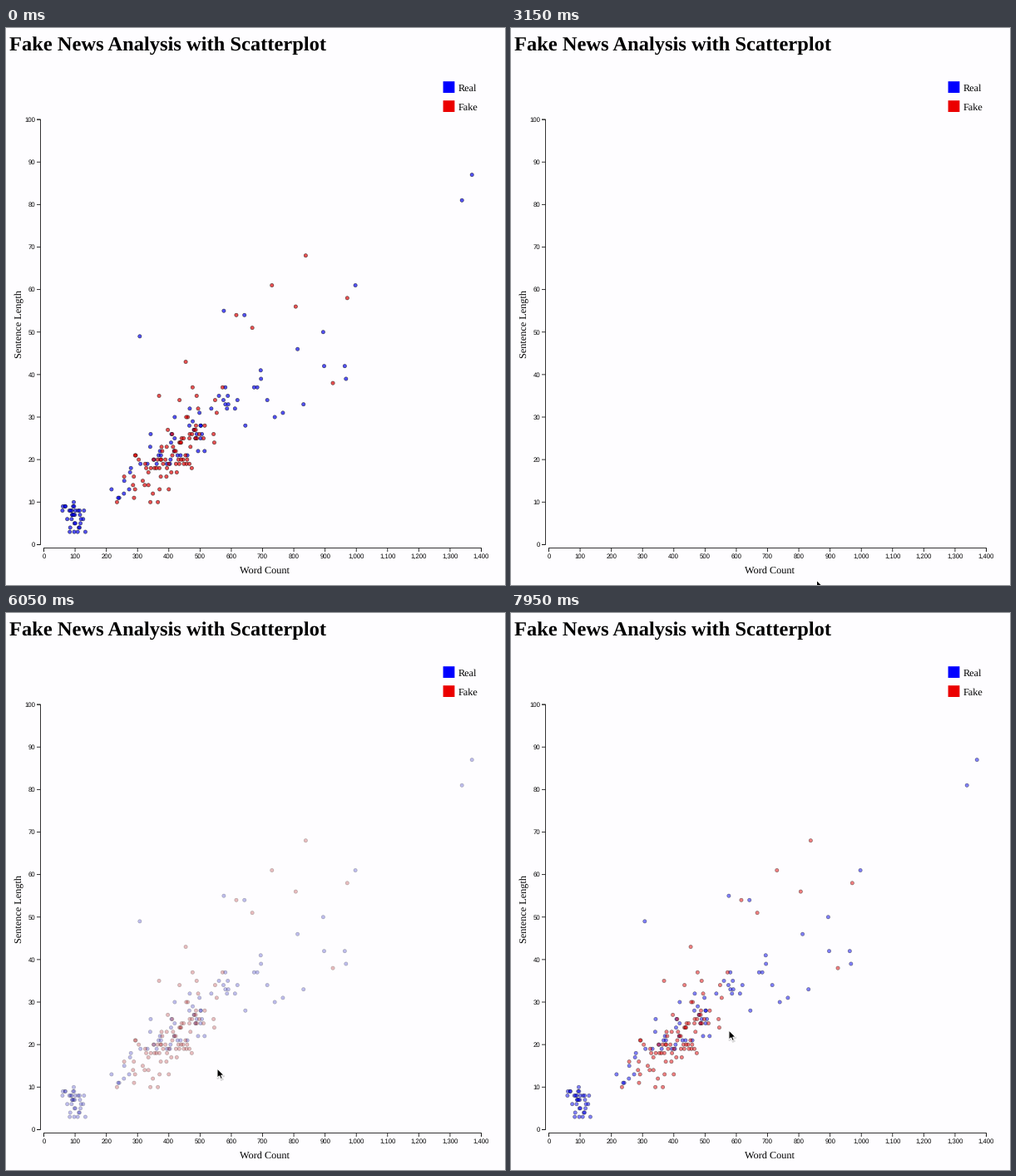
A matplotlib script that plays this animation: 600x670 px, repeating every 8000 ms.

```python
import numpy as np
import matplotlib.pyplot as plt
from matplotlib.animation import FuncAnimation
from matplotlib.patches import Polygon, Rectangle

W, H, DPI = 600, 670, 100
STEP, LOOP = 50, 8000
PT = 72 / DPI
INK = "#111111"
SERIF, SANS = "Liberation Serif", "Liberation Sans"
plt.rcParams["text.hinting"] = "none"

# the lone articles far from the clusters: word count, sentence length
REAL_FAR = [(1370, 87), (1338, 81), (997, 61), (576, 55), (642, 54),
            (894, 50), (307, 49), (812, 46), (897, 42), (963, 42),
            (967, 39), (695, 39), (831, 33), (765, 31), (739, 30), (715, 34)]
FAKE_FAR = [(838, 68), (730, 61), (971, 58), (806, 56), (616, 54),
            (667, 51), (925, 38), (454, 43)]

# pointer key points: time, x, y
PATH = np.array([(3000, 361, 669), (3600, 387, 650), (5000, 387, 650),
                 (5150, 400, 651), (5800, 256, 552), (6050, 254, 548),
                 (6500, 254, 548), (7000, 267, 503), (7400, 267, 503),
                 (7900, 262, 502)])
ARROW = np.array([(0, 0), (0, 11.2), (2.6, 8.8), (4.4, 12.6),
                  (6.3, 11.8), (4.7, 8.1), (8.2, 8.1)])

rng = np.random.default_rng(11)


def x_pos(words):
    return 45.5 + words * 526 / 1400


def y_pos(length):
    return 621.4 - length * 5.113


def cluster(n, words, spread, slope, base, noise, low, high):
    """Articles whose sentence length grows with their word count."""
    w = rng.normal(words, spread, n).clip(words - 2.2 * spread,
                                          words + 2.2 * spread)
    s = (base + slope * w + rng.normal(0, noise, n)).round().clip(low, high)
    return np.column_stack([w, s])


real = np.vstack([REAL_FAR,
                  cluster(33, 100, 21, 0, 6.5, 2.6, 3, 11),
                  cluster(55, 430, 120, 0.055, 0, 3.5, 11, 43)])
fake = np.vstack([FAKE_FAR,
                  cluster(85, 410, 80, 0.06, -3.5, 4.5, 10, 37)])
words, lengths = np.vstack([real, fake]).T
hues = np.repeat([(0, 0, 0.95), (0.88, 0, 0)], [len(real), len(fake)], axis=0)

fig = plt.figure(figsize=(W / DPI, H / DPI), dpi=DPI, facecolor="#fefdff")
ax = fig.add_axes([0, 0, 1, 1])
ax.set_xlim(0, W)
ax.set_ylim(H, 0)
ax.axis("off")
chart = []


def text(x, y, s, px, font=SERIF, **kw):
    return ax.text(x, y, s, fontsize=px * PT, family=font, color="black",
                   va="baseline", **kw)


def line(xs, ys):
    chart.extend(ax.plot(xs, ys, color=INK, lw=0.85 * PT, snap=False,
                         solid_capstyle="butt", solid_joinstyle="miter"))


def build_axes():
    line([37, 41.5, 41.5, 37], [y_pos(100), y_pos(100), y_pos(0), y_pos(0)])
    for v in range(0, 101, 10):
        y = y_pos(v)
        line([37, 41.5], [y, y])
        chart.append(text(35.2, y + 2.7, str(v), 7.75, SANS, ha="right"))
    line([45.5, 45.5, 571.5, 571.5], [630, 625.5, 625.5, 630])
    for v in range(0, 1401, 100):
        x = x_pos(v)
        line([x, x], [625.5, 630])
        chart.append(text(x, 637.6, f"{v:,}", 7.75, SANS, ha="center"))
    chart.append(text(310.5, 656.3, "Word Count", 12.25, ha="center"))
    chart.append(text(18.6, 356.3, "Sentence Length", 12.25, ha="center",
                      rotation=90, rotation_mode="anchor"))


def build_legend():
    for y, name, color in [(64.2, "Real", "#0000ff"), (87.2, "Fake", "#eb0000")]:
        box = Rectangle((525.6, y), 13.8, 13.8, fc=color, ec="none", snap=False)
        chart.append(ax.add_patch(box))
        chart.append(text(544, y + 11.3, name, 12.25))


text(3.6, 26.6, "Fake News Analysis with Scatterplot", 24.5, weight="bold")
build_axes()
build_legend()

dots = ax.scatter(x_pos(words), y_pos(lengths), s=(4.3 * PT) ** 2, c=hues,
                  edgecolors="black", linewidths=0.55 * PT, zorder=3)
shadow = ax.add_patch(Polygon(ARROW, fc="black", ec="black", lw=2 * PT,
                              alpha=0.12, zorder=5))
arrow = ax.add_patch(Polygon(ARROW, fc="black", ec="white", lw=1 * PT,
                             joinstyle="miter", zorder=6))


def opacity(t):
    if t < 1400:
        return 0.68
    return max(0, 0.12 * (t - 3800) / 1000)


def draw(i):
    t = i * STEP
    if 7000 <= t < 7400:  # the fade pauses here
        t = 7000
    for part in chart:
        part.set_visible(not 1400 <= t < 1800)

    # faint dots start out grey and gain colour as they fade in
    alpha = opacity(t)
    mix = 1 if t < 1400 else np.clip((t - 4000) / 3000, 0, 1)
    dots.set_visible(alpha > 0)
    dots.set_facecolor(0.2 + (hues - 0.2) * mix)
    dots.set_alpha(alpha)

    tip = np.array([np.interp(t, PATH[:, 0], PATH[:, k]) for k in (1, 2)])
    arrow.set_xy(ARROW + tip)
    shadow.set_xy(ARROW + tip + (0.4, 1.2))
    for part in (arrow, shadow):
        part.set_visible(t >= 3000)
    return [dots, arrow, shadow, *chart]


anim = FuncAnimation(fig, draw, frames=LOOP // STEP, interval=STEP,
                     init_func=lambda: draw(0), repeat=True, repeat_delay=0,
                     blit=False)
plt.show()
```
